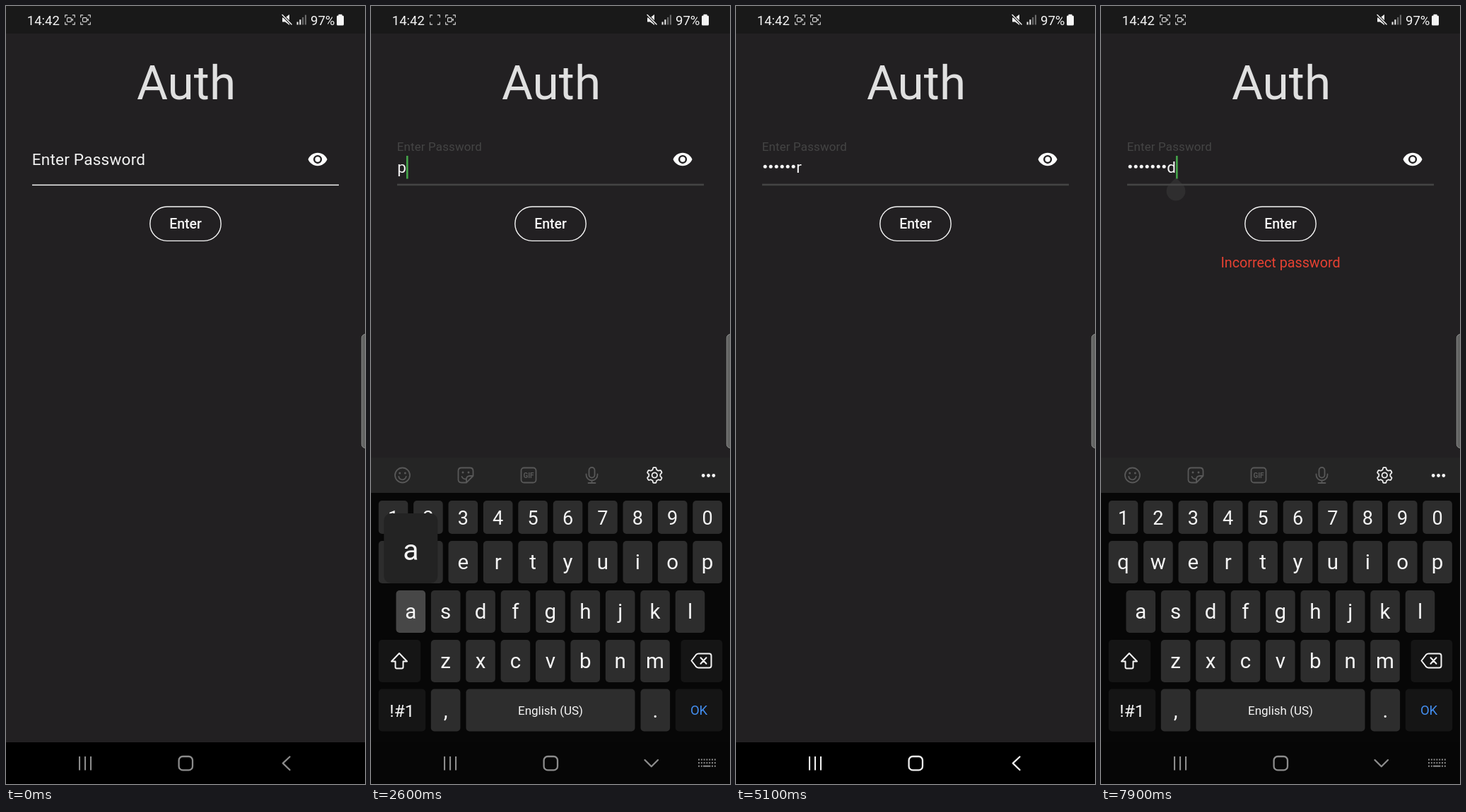
Write an HTML page with a canvas that moves like this. It is 508 px wide and 1101 px high and loops after 8000 ms.

```html
<!DOCTYPE html>
<html lang="en">
<head>
<meta charset="utf-8">
<title>Auth</title>
<style>
html, body { margin: 0; width: 100%; height: 100%; overflow: hidden; background: #222022; }
canvas { display: block; }
</style>
</head>
<body>
<canvas id="stage" width="508" height="1101"></canvas>
<script>
const W = 508, H = 1101, LOOP = 8000, STEP = 100;
const ctx = document.getElementById('stage').getContext('2d');

const EYE = new Path2D('M12 4.5C7 4.5 2.73 7.61 1 12c1.73 4.39 6 7.5 11 7.5s9.27-3.11 11-7.5c-1.73-4.39-6-7.5-11-7.5z' +
  'M12 17a5 5 0 1 1 0-10a5 5 0 0 1 0 10zm0-8a3 3 0 1 0 0 6a3 3 0 0 0 0-6z');
const SHIFT = new Path2D('M0-11L11 .5H5.5V8.5a2 2 0 0 1-2 2H-3.5a2 2 0 0 1-2-2V.5H-11Z');
const ERASE = new Path2D('M-14 0L-7.5-8.5Q-6-10-4-10H11Q14-10 14-7V7Q14 10 11 10H-4Q-6 10-7.5 8.5ZM-1-4.3L7 4.3M7-4.3L-1 4.3');
const STICKER = new Path2D('M10.5 1V-6Q10.5-10.5 6-10.5H-6Q-10.5-10.5-10.5-6V6Q-10.5 10.5-6 10.5H1L10.5 1H6Q1 1 1 6V10.5M-5.5 2Q-4 5.5 0 5.5');
const MIC = new Path2D('M-4-6.5a4 4 0 0 1 8 0V0a4 4 0 0 1-8 0ZM-8-1V0a8 8 0 0 0 16 0V-1M0 8V11.5M-5 11.5H5');

// Moment each character lands; its key goes down one step earlier.
const TYPED = [[2400, 'p'], [2700, 'a'], [3000, 's'], [3200, 's'], [3600, 'w'], [4100, 'o'], [4500, 'r'], [7900, 'd']];
const MASK_AFTER = 1500;

const KEY_W = 41.6, PITCH = 49.4;
const keys = [];
function addRow(chars, x, y, h) {
  [...chars].forEach((label, i) => keys.push({ label, x: x + i * PITCH, y, w: KEY_W, h, size: h < 50 ? 27 : 29.5 }));
}
addRow('1234567890', 10.7, 700, 47);
addRow('qwertyuiop', 10.7, 757, 60);
addRow('asdfghjkl', 35.5, 827, 60);
addRow('zxcvbnm', 84.8, 897, 60);
addRow(',', 84.8, 966.5, 60);
addRow('.', 381.5, 966.5, 60);
keys.push({ label: 'English (US)', x: 134.5, y: 966.5, w: 239, h: 60, size: 17, drop: 6 });
keys.push({ label: '!#1', x: 10.7, y: 966.5, w: 66.5, h: 60, size: 24.5, drop: 9, dark: true });
keys.push({ label: 'OK', x: 430.8, y: 966.5, w: 66.5, h: 60, size: 18.5, drop: 6.5, dark: true, color: '#438eef' });
keys.push({ label: '', x: 10.7, y: 897, w: 59.5, h: 60, dark: true });
keys.push({ label: '', x: 438.5, y: 897, w: 58.8, h: 60, dark: true });

const clamp = (v, a = 0, b = 1) => Math.max(a, Math.min(b, v));
const mix = (a, b, p) => a + (b - a) * p;
const grey = v => `rgb(${v},${v},${v})`;
const between = (t, a, b) => t >= a && t < b;

function rect(x, y, w, h, color) {
  ctx.fillStyle = color;
  ctx.fillRect(x, y, w, h);
}
function roundRect(x, y, w, h, r, fill, stroke, line = 1) {
  ctx.beginPath();
  ctx.roundRect(x, y, w, h, r);
  if (fill) { ctx.fillStyle = fill; ctx.fill(); }
  if (stroke) { ctx.strokeStyle = stroke; ctx.lineWidth = line; ctx.stroke(); }
}
function disc(x, y, r, color) {
  ctx.beginPath();
  ctx.arc(x, y, r, 0, Math.PI * 2);
  ctx.fillStyle = color;
  ctx.fill();
}
function ring(x, y, r, color, line) {
  ctx.beginPath();
  ctx.arc(x, y, r, 0, Math.PI * 2);
  ctx.strokeStyle = color;
  ctx.lineWidth = line;
  ctx.stroke();
}
function poly(points, color, line, close) {
  ctx.beginPath();
  points.forEach(([x, y]) => ctx.lineTo(x, y));
  if (close) ctx.closePath();
  ctx.lineJoin = ctx.lineCap = 'round';
  if (line) { ctx.strokeStyle = color; ctx.lineWidth = line; ctx.stroke(); }
  else { ctx.fillStyle = color; ctx.fill(); }
}
function outline(path, x, y, color, line) {
  ctx.save();
  ctx.translate(x, y);
  ctx.lineJoin = ctx.lineCap = 'round';
  ctx.strokeStyle = color;
  ctx.lineWidth = line;
  ctx.stroke(path);
  ctx.restore();
}
function text(str, x, y, size, { color = '#f5f5f5', align = 'left', weight = 400, gap = 0 } = {}) {
  ctx.font = `${weight} ${size}px Roboto, sans-serif`;
  ctx.letterSpacing = gap + 'px';
  ctx.textAlign = align;
  ctx.fillStyle = color;
  ctx.fillText(str, x, y);
}

function captureIcon(cx, camera) {
  const cy = 19.5, c = '#dcdcdc';
  for (const sx of [-1, 1]) for (const sy of [-1, 1]) {
    poly([[cx + sx * 3.8, cy + sy * 6.6], [cx + sx * 6.8, cy + sy * 6.6], [cx + sx * 6.8, cy + sy * 3.6]], c, 1.1);
  }
  if (camera) {
    roundRect(cx - 4, cy - 2.9, 5.8, 5.8, 1.2, null, c, 1.1);
    poly([[cx + 2, cy], [cx + 4.4, cy - 2], [cx + 4.4, cy + 2]], c, 0, true);
  }
}

function statusBar(t) {
  rect(0, 0, W, 39, '#191919');
  text('14:42', 29.8, 27, 18.5);
  captureIcon(90.5, Math.floor((t + 300) / 500) % 2 === 0);
  captureIcon(112.5, true);

  poly([[391, 16.5], [395, 16.5], [401, 12], [401, 27], [395, 22.5], [391, 22.5]], '#f0f0f0', 0, true);
  poly([[390, 11.5], [405, 27]], '#191919', 3.6);
  poly([[391, 12.5], [404, 26]], '#f0f0f0', 1.5);
  for (let i = 0; i < 4; i++) {
    const h = 4 + i * 3.3;
    rect(411.5 + i * 3.8, 26.5 - h, 2.1, h, i < 2 ? '#e8e8e8' : '#6c6c6c');
  }
  text('97%', 431, 27, 18.5);
  roundRect(468, 13.5, 10, 14, 1.5, '#f5f5f5');
  rect(470.5, 11.8, 5, 2.5, '#f5f5f5');
}

function cursorOn(t) {
  if (t < 900) return false;
  if (t < 2400) return t < 1200 || between(t, 1700, 2200);
  if (between(t, 4500, 7100)) return Math.floor((t - 4500) / 500) % 2 === 0;
  return true;
}

function field(t) {
  const p = t < 900 ? 0 : t < 1000 ? 0.6 : 1;
  const shade = Math.round(mix(242, 68, p));
  text('Enter Password', 36.7, mix(224.8, 204.5, p), 22.58 * mix(1, 0.75, p), { color: grey(shade), gap: 0.21 * mix(1, 0.75, p) });
  rect(37, mix(252.6, 251.6, p), 434, mix(1.5, 2.6, p), grey(shade));

  ctx.save();
  ctx.translate(426.3, 202.3);
  ctx.scale(1.227, 1.227);
  ctx.fillStyle = '#fff';
  ctx.fill(EYE, 'evenodd');
  ctx.restore();

  const done = TYPED.filter(([at]) => at <= t);
  let x = 37.3;
  done.forEach(([at, ch], i) => {
    if (i === done.length - 1 && t - at < MASK_AFTER) {
      text(ch, x, 235.5, 22.58);
      x += ctx.measureText(ch).width;
    } else {
      disc(x + 3.9, 227.2, 2.5, '#f5f5f5');
      x += 8;
    }
  });
  if (cursorOn(t)) rect(x, 212, 2.6, 32.5, '#45a64a');
  if (t >= 7100) dropHandle(x, t < 7200 ? 0.5 : t < 7900 ? 1 : 0.4);
}

function dropHandle(x, alpha) {
  const r = 13.4, cy = 262, k = r * Math.SQRT1_2;
  ctx.globalAlpha = alpha;
  ctx.beginPath();
  ctx.moveTo(x - k, cy - k);
  ctx.lineTo(x, cy - r * Math.SQRT2);
  ctx.lineTo(x + k, cy - k);
  ctx.arc(x, cy, r, -Math.PI / 4, Math.PI * 1.25);
  ctx.fillStyle = '#444';
  ctx.fill();
  ctx.globalAlpha = 1;
}

function page(t) {
  rect(0, 0, W, H, '#222022');
  text('Auth', 255, 132, 67.5, { color: '#e0e0e0', align: 'center' });
  field(t);

  roundRect(203.8, 284, 100.4, 48.4, 24.2);
  if (between(t, 5700, 6100)) {
    ctx.save();
    ctx.clip();
    disc(254, 308, 30 + (t - 5700) * 0.3, `rgba(255,255,255,${t < 5900 ? 0.1 : 0.05})`);
    ctx.restore();
  }
  roundRect(203.8, 284, 100.4, 48.4, 24.2, null, '#f5f5f5', 1.4);
  text('Enter', 254, 314.5, 19.5, { align: 'center', weight: 500 });
  if (t >= 5900) text('Incorrect password', 254, 370, 19.75, { color: '#e64132', align: 'center' });

  roundRect(503.3, 464.5, 12, 161, 5, '#636463', '#8b8c8b', 1);
}

function gear(cx, cy) {
  const points = [];
  for (let i = 0; i < 120; i++) {
    const a = i / 60 * Math.PI;
    const r = 9.5 - 1.4 * clamp(Math.cos(6 * a) * 2, -1, 1);
    points.push([cx + r * Math.cos(a), cy + r * Math.sin(a)]);
  }
  poly(points, '#f0f0f0', 1.8, true);
  ring(cx, cy, 3.7, '#f0f0f0', 1.8);
}

function toolbar() {
  const y = 664, c = '#585858';
  rect(0, 639, W, 50, '#252525');
  ring(44.5, y, 10.5, c, 1.8);
  for (const x of [40.7, 48.3]) disc(x, y - 3, 1.5, c);
  ctx.beginPath();
  ctx.arc(44.5, y + 1, 5.3, 0.15, Math.PI - 0.15);
  ctx.lineWidth = 1.7;
  ctx.stroke();

  outline(STICKER, 134, y, c, 1.8);
  for (const x of [130, 138]) disc(x, y - 4, 1.5, c);
  roundRect(212.5, y - 10.5, 21, 21, 4, null, c, 1.8);
  text('GIF', 223, y + 3.6, 10, { color: c, align: 'center', weight: 700 });
  outline(MIC, 312.5, y - 0.5, c, 1.8);
  gear(401.3, y);
  for (let i = -1; i <= 1; i++) disc(477.5 + i * 7.3, y + 0.5, 2.4, '#f5f5f5');
}

function keyboard(t, shift) {
  ctx.save();
  ctx.translate(0, shift);
  rect(0, 689, W, H, '#070707');
  toolbar();

  const down = TYPED.find(([at]) => between(t, at - STEP, at));
  let pressed;
  for (const k of keys) {
    const lit = down && down[1] === k.label;
    if (lit) pressed = k;
    roundRect(k.x, k.y, k.w, k.h, 5, lit ? '#474747' : k.dark ? '#151515' : '#2d2d2d');
    const drop = k.drop || (k.h < 50 ? 10.5 : 10);
    if (k.label) text(k.label, k.x + k.w / 2, k.y + k.h / 2 + drop, k.size, { align: 'center', color: k.color });
  }
  outline(SHIFT, 40, 927, '#f5f5f5', 2);
  outline(ERASE, 467.5, 926.5, '#f5f5f5', 2);

  if (pressed) {
    const w = 76, x = clamp(pressed.x + pressed.w / 2 - w / 2, 11, 497 - w), y = pressed.y - 109;
    roundRect(x, y, w, 99, 10, '#232323');
    text(pressed.label, x + w / 2, y + 66, 41, { align: 'center' });
  }
  ctx.restore();
}

function navBar(t, open) {
  const bright = between(t, 4700, 7200);
  const c = bright ? '#f0f0f0' : '#8c8c8c';
  rect(0, 1042, W, 59, open ? '#060606' : '#000');
  const ripple = { 4700: 0.5, 4800: 1, 4900: 0.5 }[t] || 0;
  if (ripple) {
    ctx.globalAlpha = ripple;
    roundRect(371, 1042, 50.5, 59, 25, '#3e3e3e');
    ctx.globalAlpha = 1;
  }
  for (let i = -1; i <= 1; i++) rect(111 + i * 8, 1062, 2.1, 19.5, c);
  roundRect(244.6, 1062, 19.4, 19.4, 5.5, null, c, 2.3);
  if (!open) {
    poly([[401.5, 1062.5], [391.8, 1071.7], [401.5, 1081]], c, 2.3);
    return;
  }
  poly([[387.5, 1067], [396.8, 1076.2], [406, 1067]], c, 2.3);
  for (let row = 0; row < 3; row++) for (let i = 0; i < 7; i++) {
    if (row === 2 && between(i, 2, 5)) continue;
    rect(463 + i * 3.8, 1065.5 + row * 4.6, 2, 2, c);
  }
  rect(470, 1074.7, 10.5, 2, c);
}

// How far the keyboard sits below its resting place.
function keyboardShift(t) {
  const full = 462;
  const rise = start => full * Math.exp((start - t) / 48);
  if (t < 1400 || between(t, 5100, 7300)) return full;
  if (t < 1800) return rise(1350);
  if (t < 4900) return 0;
  if (t < 5100) return t < 5000 ? 70 : 320;
  return t < 7700 ? rise(7218) : 0;
}

function draw(t) {
  const shift = keyboardShift(t), open = shift < 462;
  page(t);
  if (open) keyboard(t, shift);
  navBar(t, open);
  statusBar(t);
}

const start = performance.now();
function tick() {
  const t = (performance.now() - start) % LOOP;
  draw(Math.floor(t / STEP) * STEP);
  requestAnimationFrame(tick);
}
tick();
</script>
</body>
</html>
```
